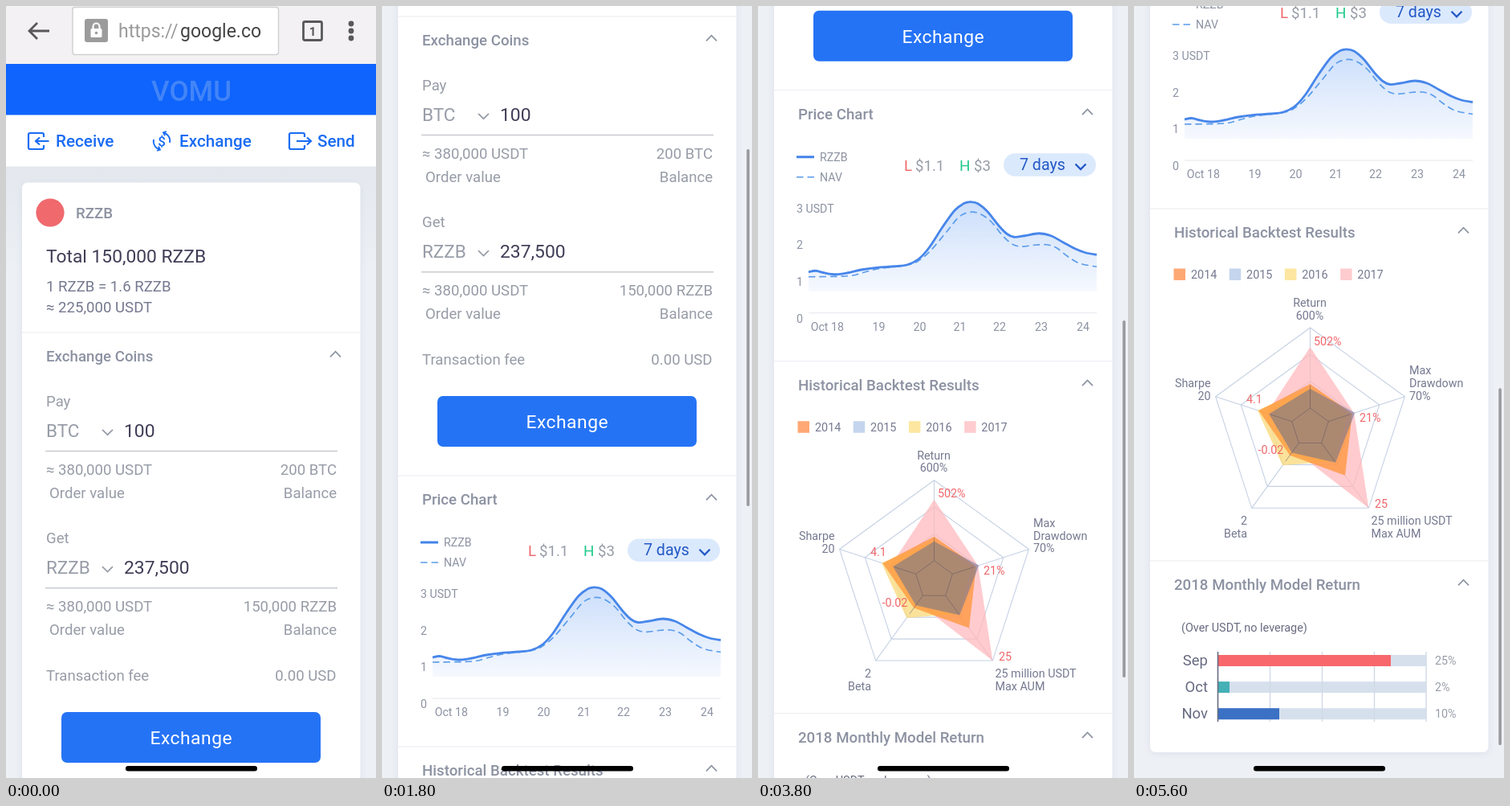
An HTML page for the animation above (5.7 s loop, 461 by 960 pixels).

```html
<!DOCTYPE html>
<html lang="en">
<head>
<meta charset="utf-8">
<title>Wallet scroll</title>
<style>
  html, body { margin: 0; width: 100%; height: 100%; overflow: hidden; background: #edf0f5; }
  svg { display: block; width: 100%; height: 100%; }
  text { font-family: Roboto, "Noto Sans", sans-serif; }
</style>
</head>
<body>
<svg id="stage" viewBox="0 0 461 960">
  <defs>
    <linearGradient id="backdrop" x1="0" y1="0" x2="0" y2="1">
      <stop offset="0" stop-color="#e4e8ee"/><stop offset="1" stop-color="#edf0f5"/>
    </linearGradient>
    <linearGradient id="area" x1="0" y1="0" x2="0" y2="1">
      <stop offset="0" stop-color="#cbdefb"/><stop offset="1" stop-color="#f6f9fe"/>
    </linearGradient>
    <filter id="soft" x="-10%" y="-5%" width="120%" height="110%"><feGaussianBlur stdDeviation="4"/></filter>
  </defs>
  <rect width="461" height="960" fill="#edf0f5"/>
  <g id="page"></g>
  <rect id="bar" x="454.3" width="3.6" height="444" rx="1.8" fill="#999a9f"/>
  <rect x="149" y="945" width="164" height="6.4" rx="3.2" fill="#000"/>
</svg>
<script>
const LOOP = 5700, STEP = 100;
const COIN = 'RZZB', BRAND = 'VOMU';
const DARK = '#3f3d56', SLATE = '#757990', MUTED = '#979ca7', HEAD = '#8c92a2';
const BLUE = '#1a6cf3', RED = '#f0676b';

const text = (x, y, s, size = 18.6, fill = MUTED, extra = '') =>
  `<text x="${x}" y="${y}" font-size="${size}" fill="${fill}" ${extra}>${s}</text>`;
const END = 'text-anchor="end"', MID = 'text-anchor="middle"', MEDIUM = 'font-weight="500"';
const rect = (x, y, w, h, fill, rx = 0) =>
  `<rect x="${x}" y="${y}" width="${w}" height="${h}" rx="${rx}" fill="${fill}"/>`;
const stroke = (d, color, width = 1, extra = '') =>
  `<path d="${d}" fill="none" stroke="${color}" stroke-width="${width}" ${extra}/>`;
const chevron = (x, y, dy, color = MUTED, width = 1.7) =>
  stroke(`M${x - 6.5} ${y - dy}L${x} ${y + dy}L${x + 6.5} ${y - dy}`, color, width);

// Smooth path through points (Catmull-Rom as Béziers)
function smooth(pts) {
  const at = i => pts[Math.max(0, Math.min(pts.length - 1, i))];
  let d = `M${pts[0]}`;
  for (let i = 0; i < pts.length - 1; i++) {
    const [a, b, c, e] = [at(i - 1), at(i), at(i + 1), at(i + 2)];
    d += `C${b[0] + (c[0] - a[0]) / 6} ${b[1] + (c[1] - a[1]) / 6} ` +
         `${c[0] - (e[0] - b[0]) / 6} ${c[1] - (e[1] - b[1]) / 6} ${c[0]} ${c[1]}`;
  }
  return d;
}

function browserBar() {
  return rect(0, 0, 461, 72, '#f3f1f3') +
    stroke('M54 31H29M39 21L29 31L39 41', '#58585a', 2.8) +
    `<rect x="83" y="1.5" width="256.5" height="59" rx="3" fill="#fff" stroke="#d0cfd1" stroke-width="1.4"/>` +
    rect(98, 16, 29, 29, '#9b9b9b', 3) +
    rect(105.5, 28, 14, 11, '#fff', 1.5) +
    stroke('M108.5 29V25.5a4 4 0 0 1 8 0V29', '#fff', 2.2) +
    `<circle cx="112.5" cy="33.5" r="1.8" fill="#9b9b9b"/>` +
    text(140, 39, 'https://', 23, '#9a9a9a') + text(217, 39, 'google.co', 23, '#444') +
    `<rect x="370.5" y="19.5" width="23" height="23" rx="2" fill="none" stroke="#58585a" stroke-width="2.8"/>` +
    text(382, 36.5, '1', 15, '#58585a', `${MID} font-weight="700"`) +
    [22, 31, 40].map(y => `<circle cx="430" cy="${y}" r="3.4" fill="#58585a"/>`).join('');
}

function navigation() {
  const frame = x => `M${x + 19} 163V160a2 2 0 0 0 -2 -2H${x + 2}a2 2 0 0 0 -2 2V176a2 2 0 0 0 2 2H${x + 17}a2 2 0 0 0 2 -2V173`;
  const label = (x, s) => text(x, 175, s, 20.7, BLUE, MEDIUM);
  return rect(0, 72, 461, 64, '#0e64fc') +
    text(231, 118, BRAND, 35, '#4385f7', `${MID} ${MEDIUM}`) +
    rect(0, 135.5, 461, 64, '#fff') +
    stroke(frame(28) + 'M53.5 168H37M42 163.5L37 168L42 172.5', BLUE, 2.2) + label(62, 'Receive') +
    stroke('M184 166a10.5 10.5 0 0 0 8 12.5M188 180l4 -1.3l-2 -4M204 170a10.5 10.5 0 0 0 -8 -12.5M200 156l-4 1.3l2 4', BLUE, 1.8) +
    text(194, 174, '$', 17, BLUE, `${MID} ${MEDIUM}`) + label(216, 'Exchange') +
    stroke(frame(353) + 'M362 168H380M375 163.5L380 168L375 172.5', BLUE, 2.2) + label(388, 'Send');
}

const section = (y, title) =>
  stroke(`M20 ${y - 36}H441.5`, '#e9ebf0', 1.2) +
  text(50, y, title, 18.7, HEAD, MEDIUM) + chevron(410.5, y - 9, -3.3, HEAD);

function orderBlock(y, label, coin, amount, balance) {
  return text(50, y, label) +
    text(50, y + 38, coin, 22.5) + chevron(126.5, y + 32, 3.2) +
    text(147, y + 38, amount, 22.9, DARK) +
    stroke(`M49 ${y + 55.5}H413`, '#c8cbd0', 1.4) +
    text(50, y + 85, '≈ 380,000 USDT') + text(412, y + 85, balance, 18.6, MUTED, END) +
    text(54, y + 114, 'Order value') + text(412, y + 114, 'Balance', 18.6, MUTED, END);
}

function exchange() {
  return `<circle cx="55" cy="257" r="17.6" fill="#f0696d"/>` +
    text(87, 264, COIN, 18.7, HEAD, MEDIUM) +
    text(50, 319, `Total 150,000 ${COIN}`, 22.8, DARK) +
    text(50, 355, `1 ${COIN} = 1.6 ${COIN}`, 18.6, SLATE) +
    text(50, 381, '≈ 225,000 USDT', 18.6, SLATE) +
    section(442, 'Exchange Coins') +
    orderBlock(498, 'Pay', 'BTC', '100', '200 BTC') +
    orderBlock(668.3, 'Get', COIN, '237,500', `150,000 ${COIN}`) +
    text(50, 839, 'Transaction fee') + text(411.5, 839, '0.00 USD', 18.6, MUTED, END) +
    rect(69, 878, 323, 63, '#2573f5', 7) +
    text(230.8, 918, 'Exchange', 22.9, '#fff', `${MID} letter-spacing=".5"`);
}

function priceChart() {
  const price = smooth([[63, 1203], [72, 1201.5], [83, 1204.2], [97, 1206], [112, 1204], [130, 1200],
    [150, 1197.3], [170, 1196], [186, 1194], [200, 1187], [213, 1173], [230, 1147], [245, 1126.5],
    [257, 1117.5], [265, 1115.8], [274, 1118], [286, 1128], [300, 1145.5], [310, 1155.5], [319, 1159.5],
    [332, 1158], [350, 1155], [365, 1158], [380, 1166], [395, 1174], [408, 1179], [422, 1181.5]]);
  const nav = smooth([[63, 1209], [112, 1208], [130, 1204], [150, 1199], [186, 1194.5], [200, 1189],
    [215, 1176.5], [235, 1153], [250, 1135], [262, 1129], [275, 1130], [290, 1140], [305, 1158],
    [318, 1169], [330, 1171.3], [345, 1169.5], [360, 1169], [372, 1173], [385, 1183], [400, 1192], [422, 1196.5]]);
  const small = (x, y, s, extra) => text(x, y, s, 14.2, HEAD, extra);
  const days = [['Oct 18', 86.3], ['19', 150.5], ['20', 201.5], ['21', 251.5], ['22', 301], ['23', 353], ['24', 405]];
  return section(1013, 'Price Chart') +
    stroke('M48 1060H70', '#4383ea', 3) + small(77, 1065, COIN) +
    stroke('M48 1085H70', '#5b9cea', 1.7, 'stroke-dasharray="8.5 5"') + small(77, 1090, 'NAV') +
    text(182, 1077, 'L', 18.8, RED) + text(196, 1077, '$1.1', 18.6) +
    text(251, 1077, 'H', 18.8, '#20ca8b') + text(269, 1077, '$3', 18.6) +
    rect(306, 1055.5, 115, 28.5, '#dbe9fd', 14.2) +
    text(326, 1076, '7 days', 19.6, '#2358c6') + chevron(402, 1072, 3.3, '#2358c6', 2.3) +
    ['3 USDT', '2', '1', '0'].map((s, i) => small(48, 1129 + i * 45.7, s)).join('') +
    `<path d="${price}V1227H63Z" fill="url(#area)"/>` +
    stroke('M63 1254H422', '#e3e6eb', 1.2) +
    stroke(nav, '#5b9cea', 1.7, 'stroke-dasharray="8.5 5"') +
    stroke(price, '#4786ea', 2.8) +
    days.map(([s, x]) => small(x, 1276, s, MID)).join('');
}

function radar() {
  const cx = 219.5, cy = 1586;
  const corner = (r, i) => {
    const a = i * Math.PI * 0.4;
    return [cx + r * Math.sin(a), cy - r * Math.cos(a)];
  };
  const sides = [0, 1, 2, 3, 4];
  const polygon = radii => 'M' + radii.map(corner).join('L') + 'Z';
  const rings = radii => radii.map(r => polygon(sides.map(() => r))).join('');
  const spokes = r => sides.map(i => `M${corner(24, i)}L${corner(r, i)}`).join('');
  const shape = (radii, fill, opacity) => `<path d="${polygon(radii)}" fill="${fill}" fill-opacity="${opacity}"/>`;
  const years = [['2014', '#fea874'], ['2015', '#c5d5ee'], ['2016', '#fde6a0'], ['2017', '#fecccf']];
  const note = (x, y, s, extra) => text(x, y + 1062, s, 14.3, SLATE, extra);
  const value = (x, y, s) => text(x, y + 1062, s, 14.3, RED);
  return section(1350, 'Historical Backtest Results') +
    years.map(([year, color], i) => rect(49.5 + i * 69.2, 1388.5, 14.5, 14.5, color) +
      text(71 + i * 69.1, 1401, year, 14.4, SLATE)).join('') +
    stroke(rings([24, 57.3, 90.7, 124]) + spokes(124), '#c6d1e4', 1.1) +
    shape([100, 57.5, 124, 35, 57], '#ffb9bd', 0.74) +
    shape([49, 49, 52, 58.5, 69], '#fbdc84', 0.82) +
    shape([54, 55, 74, 43, 67.5], '#ff9437', 0.75) +
    shape([48, 58.5, 54, 39, 54], '#5a6e96', 0.5) +
    stroke(rings([24]) + spokes(52), '#4c4658', 1, 'opacity=".42"') +
    note(219, 374, 'Return', MID) + note(219, 389.5, '600%', MID) +
    note(343, 458, 'Max') + note(343, 474, 'Drawdown') + note(343, 489.5, '70%') +
    note(95.5, 474, 'Sharpe', END) + note(95.5, 490, '20', END) +
    note(295.5, 645, '25 million USDT') + note(295.5, 661, 'Max AUM') +
    note(141, 645, '2', END) + note(141, 661, 'Beta', END) +
    value(224, 421.5, '502%') + value(281, 517, '21%') + value(300, 624, '25') +
    value(154.5, 557, '-0.02') + value(140, 494, '4.1');
}

function monthlyReturn() {
  const months = [['Sep', 25, 320, '#f7676c'], ['Oct', 2, 119, '#45b0b5'], ['Nov', 10, 181, '#3b71c5']];
  const tracks = months.map((_, i) => rect(105, 1869 + i * 33.1, 259, 14, '#d6e0ed')).join('');
  const rows = months.map(([name, pct, right, color], i) => {
    const y = 1869 + i * 33.1;
    return rect(105, y, right - 105, 14, color) +
      text(92, y + 13.2, name, 18.5, '#676b80', END) + text(375, y + 12, pct + '%', 14.3);
  }).join('');
  return section(1788, '2018 Monthly Model Return') +
    text(59, 1840, '(Over USDT, no leverage)', 14.4, '#676b80') +
    tracks +
    stroke([169.5, 234.5, 299.5, 364].map(x => `M${x} 1865V1952`).join(''), '#d0d9e7', 1.4) +
    rows + stroke('M104.5 1865V1952', '#676b80', 1.6);
}

const page = document.getElementById('page');
const bar = document.getElementById('bar');
page.innerHTML =
  rect(0, 199, 461, 130, 'url(#backdrop)') +
  `<rect x="20" y="221" width="421.5" height="1770" rx="7" fill="#c9d3e2" opacity=".55" filter="url(#soft)"/>` +
  rect(20, 219.5, 421.5, 1770.5, '#fff', 7) +
  browserBar() + navigation() + exchange() + priceChart() + radar() + monthlyReturn();

// Scroll keys: time, offset, speed in px/ms
const keys = [[200, 0, 0.1], [1000, 226.5, 0.24], [1800, 393, 0.222], [2400, 539, 0.245],
  [3200, 732, 0.235], [4400, 990, 0.16], [5600, 1062, 0]];

function scrollAt(t) {
  if (t <= keys[0][0]) return 0;
  const i = keys.findIndex(k => t <= k[0]);
  if (i < 0) return keys[keys.length - 1][1];
  const [t0, y0, v0] = keys[i - 1], [t1, y1, v1] = keys[i];
  const span = t1 - t0, u = (t - t0) / span, w = 1 - u;
  return y0 * (1 + 2 * u) * w * w + v0 * span * u * w * w +
    y1 * u * u * (3 - 2 * u) - v1 * span * u * u * w;
}

function draw(time) {
  const t = Math.floor((time % LOOP) / STEP) * STEP;
  const offset = scrollAt(t);
  page.setAttribute('transform', `translate(0 ${-offset})`);
  bar.setAttribute('y', 3.4 + offset * 0.4444);
  bar.setAttribute('opacity', offset > 0 ? 1 : 0);
}

const start = performance.now();
function tick() {
  draw(performance.now() - start);
  requestAnimationFrame(tick);
}
tick();
</script>
</body>
</html>
```
